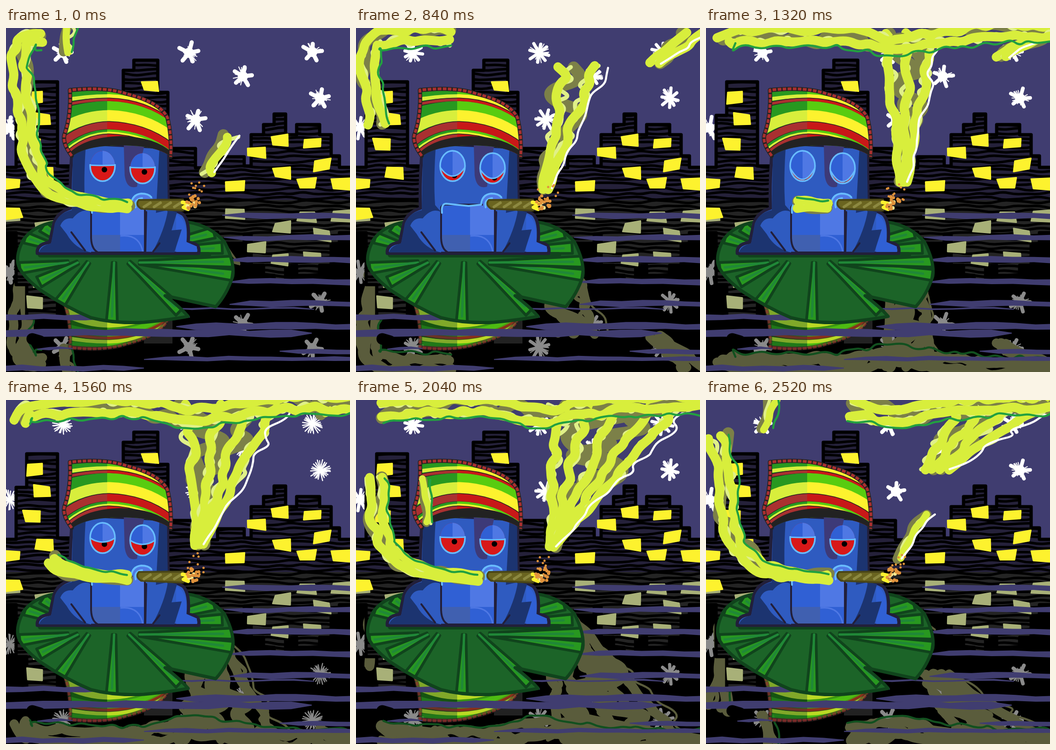
Animation of 748x748 px, one loop 2640 ms. Source, as an HTML page with a canvas:

```html
<!DOCTYPE html>
<html lang="en">
<head>
<meta charset="utf-8">
<title>Frog on a lily pad</title>
<style>
html, body { margin: 0; width: 100%; height: 100%; overflow: hidden; background: #403d70; }
canvas { display: block; width: 748px; height: 748px; }
</style>
</head>
<body>
<canvas id="stage" width="748" height="748"></canvas>
<script>
const c = document.getElementById('stage').getContext('2d');
c.lineCap = c.lineJoin = 'round';
const STEP = 120, COUNT = 22, WATER = 374;
const SKY = '#403d70', INK = '#221f3a', DEEP = '#1c3470', MID = '#2f5bc0',
  BLUE = '#3060d4', LIGHT = '#4f78e4', CYAN = '#68bcff', YELLOW = '#fdf22e', ORANGE = '#e0923c';
const SMOKE = { d: '#7c8048', l: '#e0f088', y: '#d8ee3c', g: '#22a040', w: '#fff' };
const MURK = { d: '#5a5c3c', l: '#5a5c3c', y: '#5a5c3c', g: '#12501f', w: '#5a5c3c' };

let seed = 1;
const rnd = () => (seed = seed * 16807 % 2147483647) / 2147483647;
const jit = a => (rnd() * 2 - 1) * a;
const mix = (a, b, u) => a + (b - a) * u;

// rows are [time, ...values]; gives the values at t, or null outside the rows
function track(rows, t) {
  const n = rows.findIndex(r => r[0] >= t);
  if (n < 0 || t < rows[0][0]) return null;
  const b = rows[n], a = rows[n - 1] || b, u = a == b ? 0 : (t - a[0]) / (b[0] - a[0]);
  return b.slice(1).map((v, k) => mix(a[k + 1], v, u));
}

function shape(d, fill, stroke, w = 4) {
  const p = new Path2D(d);
  if (fill) { c.fillStyle = fill; c.fill(p); }
  if (stroke) { c.strokeStyle = stroke; c.lineWidth = w; c.stroke(p); }
}
const poly = (pts, fill, stroke, w) => shape('M' + pts.join('L') + 'Z', fill, stroke, w);
function dot(x, y, r, color) {
  c.fillStyle = color;
  c.beginPath();
  c.arc(x, y, r, 0, 7);
  c.fill();
}
function curve(pts, color, w) {
  let d = 'M' + pts[0];
  pts.forEach(([x, y], i) => {
    const q = pts[i + 1];
    d += q ? `Q${x} ${y} ${(x + q[0]) / 2} ${(y + q[1]) / 2}` : `L${x} ${y}`;
  });
  shape(d, null, color, w);
}
function within(path, draw) {
  c.save();
  c.clip(path);
  draw();
  c.restore();
}
function box(x, y, w, h) {
  const p = new Path2D();
  p.rect(x, y, w, h);
  return p;
}
function flipped(height, draw) {
  within(box(0, WATER, 748, 374), () => {
    c.translate(0, height);
    c.scale(1, -1);
    draw();
  });
}

// ---- city and stars ----
const ROOFS = [[-9, 303], [22, 190], [45, 117], [112, 300], [145, 374], [255, 92], [278, 70], [330, 140], [352, 262],
  [412, 304], [460, 280], [518, 300], [533, 232], [560, 210], [583, 187], [608, 232], [632, 210], [682, 232],
  [707, 278], [725, 303]];
const CITY = new Path2D('M-9 420' + ROOFS.map(([x, y]) => `H${x}V${y}`).join('') + 'H760V420Z');
const WINDOWS = [[60, 153], [78, 199], [57, 254], [84, 316], [10, 338], [314, 126], [543, 269], [596, 246],
  [667, 250], [687, 298], [602, 315], [655, 340], [730, 340], [498, 342]];

function pane([x, y], color) {
  const w = 13 + y * .018, h = 11;
  poly([[-1, -1], [1, -1], [1, 1], [-1, 1]].map(([a, b]) => [x + a * w + jit(4), y + b * h + jit(4)]), color, color, 3);
}
function city(wall, glass) {
  seed = 7700;
  within(CITY, () => {
    c.fillStyle = wall;
    c.fillRect(0, 0, 748, 420);
    for (let y = 70; y < 385; y += 10) {
      const line = [];
      for (let x = -5; x < 775; x += 26) line.push([x, y + jit(4)]);
      curve(line, '#000', 5.5);
    }
  });
  c.strokeStyle = '#000';
  c.lineWidth = 7;
  c.stroke(CITY);
  WINDOWS.forEach(w => pane(w, glass));
}

const STARS = [[123, 54], [398, 54], [515, 105], [683, 153], [413, 199], [8, 217], [666, 52]];
function stars(style, color) {
  seed = 3100 + style * 97;
  for (const [x, y] of STARS) {
    const r = 24 + jit(2), arms = [5, 5, 8, 20, 5][style], w = [9, 8, 7, 2.5, 8][style];
    const ray = (a, len, w) => shape(`M${x} ${y}l${Math.cos(a) * len} ${Math.sin(a) * len}`, null, color, w);
    for (let i = 0; i < arms; i++) ray(i * 2 * Math.PI / arms - 1.4 + jit(.12), r * mix(.75, 1, rnd()), w);
    if (arms == 5) dot(x, y, 11, color);
    for (let i = 0; i < 14; i++) ray(rnd() * 6.3, r * mix(.5, .95, rnd()), 2);
  }
}

// ---- water ----
function band(a, b, y, h) {
  const top = [], low = [], n = Math.max(3, Math.round((b - a) / 45));
  for (let i = 0; i <= n; i++) {
    const x = mix(a, b, i / n), tip = (i == 0 && a > 0) || (i == n && b < 748);
    const half = tip ? 1 : h / 2 * mix(.75, 1.1, rnd()), m = y + jit(2);
    top.push([x, m - half]);
    low.unshift([x, m + half]);
  }
  poly(top.concat(low), SKY);
}
function water() {
  seed = 900;
  for (let i = 0; i < 5; i++) band(470 + i * 4, 760, 409 + i * 47.5, 13);
  band(370, 760, 649, 15);
  band(595, 760, 703, 10);
  band(300, 760, 719, 10);
  band(360, 670, 610, 4);
  band(-9, 400, 628, 13);
  band(-9, 665, 663, 16);
  band(68, 145, 697, 7);
  band(-9, 300, 740, 13);
  shape('M57 676L74 681', null, '#000', 25);
}

// ---- lily pad ----
const PAD = 'M105 422Q60 430 38 460Q22 490 26 512Q30 535 75 570Q130 607 185 630Q235 643 300 640Q360 634 396 627Q378 606 346 582L456 606Q480 580 493 540Q498 510 475 465Q445 430 395 422Z';
const VEINS = [[30, 522], [72, 552], [118, 597], [230, 640], [378, 616], [492, 537], [492, 508], [470, 478],
  [452, 445], [42, 456], [80, 432]];
function lily() {
  const edge = '#10441c';
  within(new Path2D(PAD), () => {
    shape(PAD, '#1c6428');
    for (const [x, y] of VEINS) {
      const ix = mix(240, x, x < 300 ? .5 : .2), iy = y < 500 ? 488 : 510;
      const len = Math.hypot(x - ix, y - iy), nx = (iy - y) / len * 12, ny = (x - ix) / len * 12;
      poly([[ix - nx / 3, iy - ny / 3], [x - nx, y - ny], [x + nx, y + ny], [ix + nx / 3, iy + ny / 3]], '#289820', edge, 6);
      shape(`M${ix} ${iy}L${mix(ix, x, .9)} ${mix(iy, y, .9)}`, null, '#208838', 5);
    }
    shape('M75 493H440', null, edge, 12);
  });
  shape(PAD, null, edge, 7);
}

// ---- frog ----
const HAT = 'M138 133Q215 126 262 142Q335 160 352 195Q362 235 360 282Q335 256 250 255Q170 256 143 280Q120 250 124 232Q140 190 138 133Z';
const ROPE = 'M143 278Q122 250 127 232Q142 190 139 135Q215 127 262 143Q335 161 351 195Q361 235 358 280';
const BRIM = 'M140 286Q170 248 250 246Q330 248 362 288';
// [height, width, colour] from the crown down
const STRIPES = [[133, 7, 0], [140, 9, 1], [148, 8, 2], [156, 6, 0], [166, 14, 1], [191, 25, 2], [212, 16, 0],
  [223, 5, 1], [228, 5, 2], [235, 8, 0]];
const DIM = ['#aa3030', '#289820', '#d8ee3c'], BRIGHT = ['#c81818', '#58cc10', YELLOW];

function stripes(colors) {
  shape(HAT, colors[1]);
  for (const [y, w, k] of STRIPES) {
    const d = `M116 ${y + (y - 125) * .5}Q165 ${y} 225 ${y}Q310 ${y + 3} 368 ${y + 55}`;
    if (!k) shape(d, null, '#222', w + 3);
    shape(d, null, colors[k], w);
  }
}
function hat() {
  within(new Path2D(HAT), () => {
    stripes(DIM);
    within(box(220, 100, 200, 200), () => stripes(BRIGHT));
    shape(BRIM, null, '#222', 22);
  });
  shape(ROPE, null, '#222', 9);
  c.lineCap = 'butt';
  c.setLineDash([8, 3]);
  shape(ROPE, null, '#aa3030', 6);
  c.setLineDash([]);
  c.lineCap = 'round';
}

function eye(x, y, lid) {
  const ball = new Path2D(), edge = `M${x - 30} ${y - 2}Q${x} ${y + lid * 2} ${x + 30} ${y - 2}`;
  const cover = edge + `V${y - 40}H${x - 30}Z`;
  ball.ellipse(x, y, 27, 33, 0, 0, 7);
  within(ball, () => {
    c.fillStyle = '#d81818';
    c.fillRect(x - 30, y - 40, 60, 80);
    dot(x + 4, y + 8 + lid * .55, 6, '#000');
    shape(cover, BLUE);
    within(box(x, y - 40, 30, 90), () => shape(cover, LIGHT));
    shape(edge, null, CYAN, 3);
  });
  within(box(x - 32, y - (lid > 4 ? 40 : 4), 64, 80), () => {
    c.strokeStyle = CYAN;
    c.lineWidth = 3.5;
    c.stroke(ball);
  });
}

function frog(lid) {
  shape('M145 250Q138 330 140 392Q112 400 104 425L95 466Q66 470 68 490H419Q424 468 396 466Q400 420 385 405Q370 395 354 396Q350 330 352 260Z', MID, INK, 7);
  shape('M146 250H174Q168 330 172 385L185 400 185 488H72Q75 474 98 468L106 425Q115 402 143 396Z', DEEP);
  shape('M334 256H350L352 396 326 402Z', DEEP);
  shape('M256 250H302Q290 300 285 345Q262 352 258 320Z', '#3d3a78');
  shape('M370 405Q395 415 392 465L415 475V487H370Z', BLUE);
  shape('M318 488Q345 440 352 396L372 400 360 440 382 438 366 488Z', DEEP);
  shape('M118 430Q125 412 145 414Q165 390 185 400V488Q150 480 132 448Z', MID);
  shape('M142 444L172 484M305 400L303 486M334 468L320 486', null, INK, 4);
  const belly = new Path2D('M185 390Q188 383 200 384H302V488H200Q184 480 185 450Z');
  within(belly, () => {
    [BLUE, LIGHT, '#4060b0', BLUE].forEach((color, k) => {
      c.fillStyle = color;
      c.fillRect(180 + k % 2 * 68, k < 2 ? 380 : 450, 68, 70);
    });
    shape('M250 452Q292 448 298 490', null, LIGHT, 3);
  });
  c.strokeStyle = INK;
  c.lineWidth = 4;
  c.stroke(belly);
  shape('M276 386Q272 362 296 360Q318 360 320 374L290 396Z', LIGHT);
  shape('M187 402Q185 382 196 382L245 387 272 384Q274 362 294 360Q310 360 316 368M282 390Q278 372 296 370', null, CYAN, 4);
  hat();
  eye(210, 300, lid);
  eye(297, 305, lid);
  shape('M289 374L385 373V397L294 393Q280 384 289 374Z', '#6a6420', '#4a4618', 4);
  for (let x = 300; x < 380; x += 22) shape(`M${x} 389l14 -9`, null, '#8c8840', 6);
  shape('M384 379L398 382 386 390 396 394', null, YELLOW, 8);
}

function ember(i) {
  seed = 9000 + i * 1313;
  const scatter = (n, x, y, spread, r, color) => {
    while (n--) {
      const a = rnd() * 6.3, q = Math.sqrt(rnd()) * spread;
      dot(x + Math.cos(a) * q, y + Math.sin(a) * q, r, color);
    }
  };
  scatter(4, 403, 384, 10, 4, '#f8e890');
  scatter(18, 407, 380, 16, 3.5, ORANGE);
  scatter(11, 416, 357, 24, 2.5, ORANGE);
}

// ---- smoke ----
// The breath runs along one route; rows give its tail and head as distances from the mouth.
const ROUTE = [[265, 385], [200, 384], [120, 366], [65, 320], [48, 260], [42, 170], [22, 80], [40, 22], [130, 15],
  [300, 15], [400, 36], [600, 8], [770, 4]];
const BREATH = [[11, 0, 65], [15, 0, 281], [17, 0, 371], [21, 0, 463], [22, 0, 560], [25, 225, 590], [29, 330, 690],
  [33, 520, 1260], [37, 480, 1260], [39, 540, 1260], [43, 800, 1260], [44, 940, 1260], [47, 1120, 1260], [55, 1120, 1260]];
// Rows of the rising puffs: foot x y, top x y, half widths.
const PUFFS = [
  [[21, 418, 345, 478, 248, 7, 16], [22, 438, 315, 488, 235, 14, 22], [25, 480, 232, 570, 95, 24, 28],
    [29, 650, 75, 735, 10, 18, 36], [33, 640, 62, 740, 8, 16, 28], [35, 690, 30, 780, -20, 14, 20]],
  [[24, 406, 365, 420, 320, 8, 14], [25, 410, 355, 435, 268, 16, 28], [29, 412, 350, 485, 85, 12, 62],
    [33, 430, 335, 440, 10, 12, 72], [37, 412, 295, 540, 10, 8, 175], [39, 428, 318, 570, 10, 9, 165],
    [43, 500, 150, 650, 0, 36, 125], [44, 595, 85, 650, 0, 40, 130], [47, 665, 40, 720, 0, 20, 55]]
];
const SNORT = [[14, 185, 335, 175, 290, 12, 12], [15, 188, 322, 154, 265, 14, 16], [17, 160, 268, 150, 172, 8, 12],
  [21, 133, 62, 147, 0, 15, 15], [22, 130, 52, 142, -10, 14, 15], [24, 130, -20, 140, -80, 14, 15]];

function along(s) {
  for (let i = 1; i < ROUTE.length; i++) {
    const [ax, ay] = ROUTE[i - 1], [bx, by] = ROUTE[i], len = Math.hypot(bx - ax, by - ay);
    if (s <= len || i == ROUTE.length - 1) return [mix(ax, bx, s / len), mix(ay, by, s / len), (ay - by) / len, (bx - ax) / len];
    s -= len;
  }
}

// at(u) gives [x, y, side x, side y, half width] along a plume
function plume(at, length, wide, edge, colors) {
  const lanes = 1 + Math.round(wide / 45);
  const strand = (key, w, lo, hi, gap) => {
    const n = Math.max(2, Math.round(length / gap)), pts = [];
    for (let i = 0; i <= n; i++) {
      const [x, y, nx, ny, h] = at(i / n), off = mix(lo, hi, rnd()) * h;
      pts.push([x + nx * off + jit(3), y + ny * off + jit(3)]);
    }
    curve(pts, colors[key], w);
  };
  const body = Math.min(20, 8 + wide / 2);
  strand('d', body * 1.3, -1, lanes > 1 ? 1 : 0, 26);
  if (lanes > 2) strand('d', body * 1.3, -.9, .9, 20);
  for (let k = 0; k < lanes; k++) {
    const lane = (2 * k + 1) / lanes - 1, room = .9 / lanes;
    strand('l', body * .45, lane - room, lane + room, 13);
    strand('y', body, lane - room * .6, lane + room * .6, 20);
  }
  strand(edge, 4.5, .75, 1.2, 18);
}
function rise(row, edge, colors) {
  if (!row) return;
  const [x1, y1, x2, y2, a, b] = row;
  plume(u => [mix(x1, x2, u), mix(y1, y2, u), 1, 0, mix(a, b, u)], Math.hypot(x2 - x1, y2 - y1), Math.max(a, b), edge, colors);
}
function breathe(row, colors) {
  if (!row) return;
  const [tail, head] = row;
  plume(u => {
    const s = mix(tail, head, u);
    return [...along(s), mix(8, 26, Math.min(1, s / 260))];
  }, head - tail, 24, 'g', colors);
}
function smoke(i, colors) {
  seed = 50000 + i * 7919;
  for (const t of [i, i + COUNT]) {
    PUFFS.forEach(rows => rise(track(rows, t), 'w', colors));
    breathe(track(BREATH, t), colors);
    rise(track(SNORT, t), 'g', colors);
  }
}

const LID = [[0, 0], [3, 15], [7, 23], [11, 30], [14, 0], [22, 0]];

function paint(i) {
  c.fillStyle = SKY;
  c.fillRect(0, 0, 748, 748);
  stars(i % 5, '#fff');
  city('#25213a', YELLOW);
  c.fillStyle = '#000';
  c.fillRect(0, 380, 748, 368);
  flipped(748, () => {
    stars(i % 5, '#8a8a8a');
    smoke(i, MURK);
    city('#242424', '#a8b078');
  });
  pane([12, 403], YELLOW);
  shape('M300 630H362V686H300Z', '#222');
  flipped(830, () => { c.globalAlpha = .55; hat(); });
  water();
  lily();
  frog(track(LID, i)[0]);
  smoke(i, SMOKE);
  ember(i);
}

const start = performance.now();
let shown = -1;
function tick() {
  const i = Math.floor((performance.now() - start) / STEP) % COUNT;
  if (i != shown) paint(shown = i);
  requestAnimationFrame(tick);
}
tick();
</script>
</body>
</html>
```
